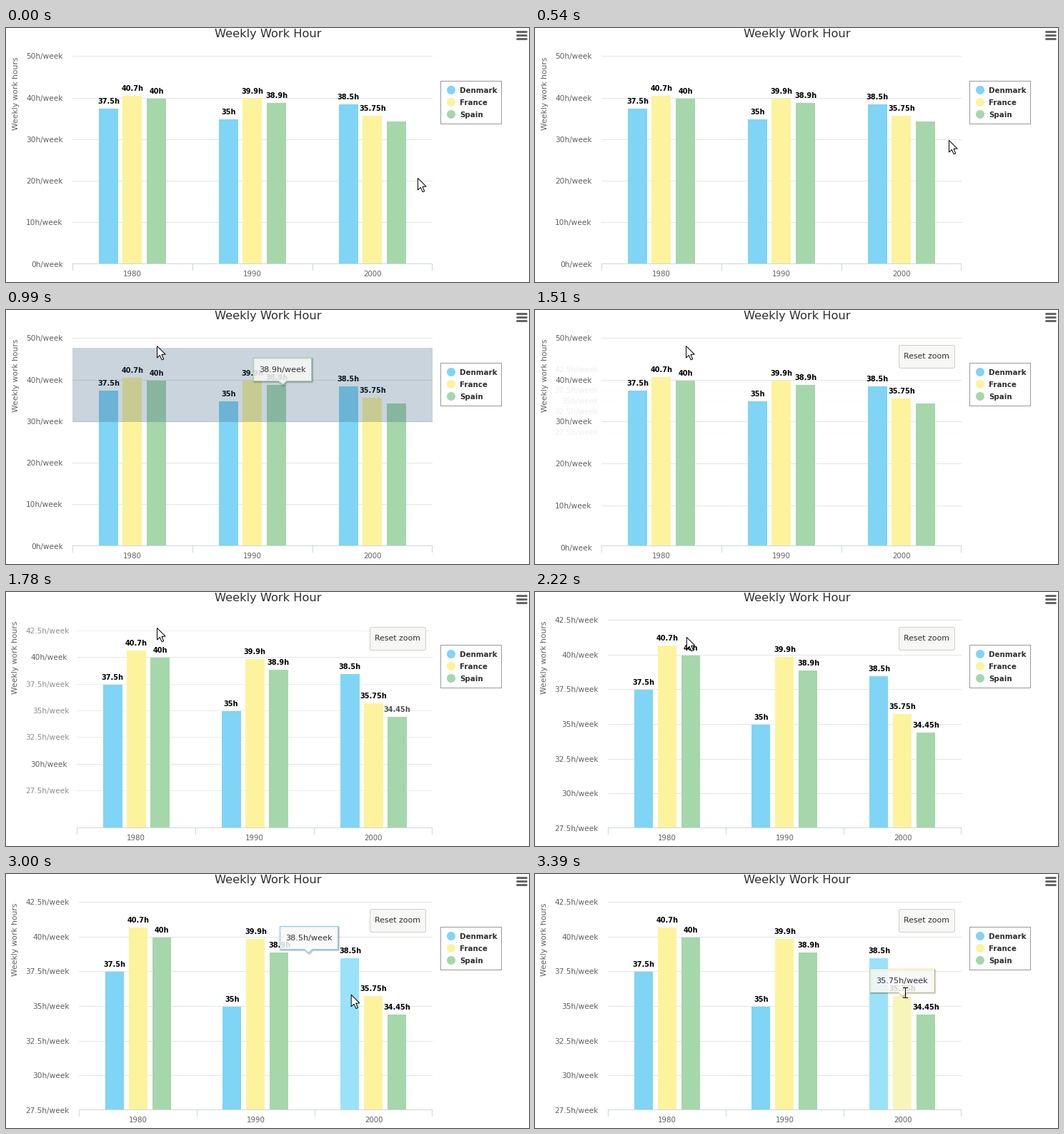
Write a matplotlib script that moves like this. It is 732 px wide and 356 px high and loops after 4.32 s.

```python
import math

import matplotlib.pyplot as plt
import numpy as np
from matplotlib.animation import FuncAnimation
from matplotlib.patches import Circle, FancyBboxPatch, Polygon, Rectangle

W, H, DPI = 732, 356, 100
STEP, LOOP = 30, 4320
PT = 72 / DPI  # points per pixel

plt.rcParams["font.family"] = "DejaVu Sans"

YEARS = ["1980", "1990", "2000"]
SERIES = ["Denmark", "France", "Spain"]
HOURS = [[37.5, 40.7, 40], [35, 39.9, 38.9], [38.5, 35.75, 34.45]]
COLORS = ["#80d4f6", "#fdf39c", "#a5d7ab"]
BRIGHT = ["#9ae2fa", "#f7f6b8", "#bce8c1"]
GRAY, DARK, AXIS = "#606060", "#303030", "#cbd8da"

RIGHT, BASE, SPAN = 597, 330.6, 291.2
PLOT_TOP, PLOT_END = 39, 330
OLD_TICKS = set(range(0, 51, 10))
NEW_TICKS = set(np.arange(27.5, 43, 2.5))

DRAG_START, ZOOM_START, ZOOM_TIME = 570, 1479, 475
POLL = 90  # how often the chart looks at the pointer
UNHOVER, TIP_STAY, TIP_FADE = 240, 400, 120

# Pointer strokes: start, end, bend point, end point
REST = (576, 210)
STROKES = [
    (60, 240, (578, 185), (579, 157)),
    (540, 990, (436, 126), (211, 50)),
    (2190, 2720, (212, 168), (424, 158)),
    (2760, 3270, (500, 176), (518, 166)),
]

fig = plt.figure(figsize=(W / DPI, H / DPI), dpi=DPI, facecolor="white")
ax = fig.add_axes([0, 0, 1, 1])
ax.set_xlim(0, W)
ax.set_ylim(H, 0)
ax.axis("off")

live = []


def keep(artist):
    """Stack artists in the order they are drawn."""
    artist.set_zorder(len(live) + 1)
    live.append(artist)


def patch(shape):
    keep(ax.add_patch(shape))


def rect(x, y, w, h, color, alpha=1):
    patch(Rectangle((x, y), w, h, fc=color, ec="none", lw=0, alpha=alpha, aa=False))


def round_box(x, y, w, h, r, fill, edge):
    style = f"round,pad=0,rounding_size={r}"
    patch(FancyBboxPatch((x, y), w, h, boxstyle=style, fc=fill, ec=edge, lw=PT))


def poly(points, fill, edge, width, alpha=1):
    patch(Polygon(points, closed=True, fc=fill, ec=edge, lw=width * PT,
                  alpha=alpha, joinstyle="round"))


def text(x, y, s, size, color=GRAY, ha="left", va="baseline", **kw):
    keep(ax.text(x, y, s, fontsize=size * PT, color=color, ha=ha, va=va, **kw))


def clamp(v):
    return min(1, max(0, v))


def mix(a, b, k):
    return a + (b - a) * k


def zoom_at(t):
    return 0.5 - math.cos(math.pi * clamp((t - ZOOM_START) / ZOOM_TIME)) / 2


def pointer_at(t):
    pos = np.array(REST, float)
    for start, end, bend, goal in STROKES:
        u = clamp((t - start) / (end - start))
        bend, goal = np.array(bend), np.array(goal)
        pos = (1 - u) ** 2 * pos + 2 * u * (1 - u) * bend + u * u * goal
    return pos


def y_of(v, p):
    return BASE - SPAN * mix(v / 50, (v - 27.5) / 15, p)


def left_of(p):
    return mix(93, 102.4, p)


def unit_of(p):
    return (RIGHT - left_of(p)) / 3


def bar_center(year, s, p):
    return left_of(p) + unit_of(p) * (year + 0.5 + 0.2 * (s - 1))


def bars():
    return [(year, s, v) for year, row in enumerate(HOURS) for s, v in enumerate(row)]


def bar_under(x, y, p):
    half = unit_of(p) * 0.08
    for year, s, v in bars():
        if abs(x - bar_center(year, s, p)) < half and y > y_of(v, p) - 8:
            return year, s
    return None


def simulate():
    """Per frame: hovered bar, bar highlights and the chasing tooltip."""
    states = []
    glow = np.zeros((3, 3))
    hover = owner = tip = None
    left_at = 0
    for t in range(0, LOOP, STEP):
        p = zoom_at(t)
        if t % POLL == 0:
            found = bar_under(*pointer_at(t), p)
            if hover and not found:
                left_at = t
            hover = found
        owner = hover or owner

        if t < DRAG_START or t >= ZOOM_START:
            if not (hover and states[-1][0] == hover):
                glow = np.maximum(0, glow - (STEP / UNHOVER if not t % POLL == 0 or not hover else 0))
            if hover:
                glow[hover] = 1

        alpha = 1 if hover else clamp(1 - (t - left_at - TIP_STAY) / TIP_FADE)
        if alpha == 0 or 0 < p < 1:
            owner = None
        if owner:
            goal = np.array([bar_center(*owner, p) + 1, y_of(HOURS[owner[0]][owner[1]], p)])
            tip = goal if tip is None else tip + (goal - tip) * (1 / 3, 1 / 2)
        else:
            tip = None
        states.append((hover, glow.copy(), owner, tip, alpha))
    return states


STATES = simulate()


def draw_ticks(p):
    x0 = round(left_of(p))
    for v in sorted(OLD_TICKS | NEW_TICKS):
        old, new = v in OLD_TICKS, v in NEW_TICKS
        fade_in = mix(0.1, 1, p) if p > 0 else 0
        alpha = 1 if old and new else 1 - p if old else fade_in
        y = y_of(v, p)
        if alpha < 0.01 or not -10 < y < H + 10:
            continue
        if PLOT_TOP <= round(y) < PLOT_END:
            rect(x0, round(y), RIGHT - x0, 1, "#e2e5e2", alpha)
        label_x = mix(79.5, 88.5, p) if old else 88.5
        text(label_x, y + 4, f"{v:g}h/week", 10.5, ha="right", alpha=alpha)


def draw_bars(glow, p):
    w = unit_of(p) * 0.16
    for year, s, v in bars():
        x = round(bar_center(year, s, p) - w / 2 - 0.1)
        top = round(y_of(v, p)) + 1
        rect(x, top, round(w), PLOT_END - top, COLORS[s])
        if glow[year, s] > 0:
            rect(x, top, round(w), PLOT_END - top, BRIGHT[s], glow[year, s])


def draw_axis(p):
    x0 = left_of(p)
    rect(round(x0), PLOT_END, RIGHT - round(x0), 1, AXIS)
    for i in range(4):
        rect(min(round(mix(x0, RIGHT, i / 3)), RIGHT - 1), PLOT_END, 1, 10, AXIS)
    for i, name in enumerate(YEARS):
        text(bar_center(i, 1, p), 348, name, 10.2, ha="center")
    text(mix(14, 13, p), 91.5, "Weekly work hours", 10.8,
         ha="center", va="center", rotation=90)


def draw_values(p):
    for year, s, v in bars():
        alpha = p if v == 34.45 else 1  # no room for the lowest before the zoom
        if alpha > 0:
            text(bar_center(year, s, p), y_of(v, p) - 6, f"{v:g}h", 9.8,
                 "black", ha="center", weight="bold", alpha=alpha)


def draw_frame_parts():
    text(367, 13, "Weekly Work Hour", 16.2, DARK, ha="center")
    for y in (4.5, 9.5, 14.5):
        round_box(714.7, y, 14.6, 2, 1, "#666666", "#666666")
    rect(608, 74, 86, 61, "#999999")
    rect(609, 75, 84, 59, "white")
    for i, name in enumerate(SERIES):
        y = 87 + 17 * i
        patch(Circle((623, y), 6, fc=COLORS[i], ec="none"))
        text(635, y + 4, name, 10.3, DARK, weight="bold")


def draw_reset():
    round_box(509.5, 49.5, 78, 32, 2.5, "#f7f7f6", "#cfcfc6")
    text(516, 68, "Reset zoom", 10.9, DARK)


def draw_tip(bar, pos, alpha):
    year, s = bar
    label = f"{HOURS[year][s]:g}"
    w = 55 + 8 * len(label.replace(".", "")) + 3 * ("." in label)
    x, tip = pos[0], round(pos[1]) + 0.5
    x0, x1 = round(x - w / 2) + 0.5, round(x + w / 2) - 0.5
    low, top = tip - 5, tip - 37
    shape = np.array([(x0, top), (x1, top), (x1, low), (x + 5, low), (x, tip),
                      (x - 6, low), (x0, low)])
    for width, dark in ((5, 0.05), (3, 0.1), (1, 0.15)):
        poly(shape + 1, "none", "black", width, dark * alpha)
    poly(shape, "#f9f9f8", "none", 0, 0.85 * alpha)
    poly(shape, "none", COLORS[s], 1, alpha)
    text(x0 + 8, top + 19, label + "h/week", 11.3, DARK, alpha=alpha)


def draw_beam(x, y):
    x, y = round(x), round(y)
    rect(x, y - 7, 1, 15, "black")
    for end in (y - 7, y + 7):
        rect(x - 3, end, 3, 1, "black")
        rect(x + 1, end, 3, 1, "black")


def draw_arrow(x, y):
    outline = [(0, 0), (0, 16.5), (3.8, 13), (6.7, 19.3), (9.2, 18.2),
               (6.5, 12), (11.6, 11.6)]
    poly(np.array(outline) + (x + 0.5, y + 0.5), "white", "black", 1)


def update(i):
    while live:
        live.pop().remove()
    t = i * STEP
    p = zoom_at(t)
    x, y = pointer_at(t)
    hover, glow, owner, tip, alpha = STATES[i]

    draw_ticks(p)
    draw_bars(glow, p)
    draw_axis(p)
    draw_values(p)
    draw_frame_parts()
    if t >= ZOOM_START:
        draw_reset()
    elif t >= DRAG_START:
        top = round(min(y + 3, 156))
        rect(93, top, RIGHT - 93, 157 - top, "#2f5a78", 0.26)
    if owner:
        draw_tip(owner, tip, alpha)
    over_label = hover and y < y_of(HOURS[hover[0]][hover[1]], p) - 3
    (draw_beam if over_label else draw_arrow)(x, y)
    return live


anim = FuncAnimation(fig, update, frames=LOOP // STEP, interval=STEP,
                     repeat=True, repeat_delay=0, blit=False)
plt.show()
```
